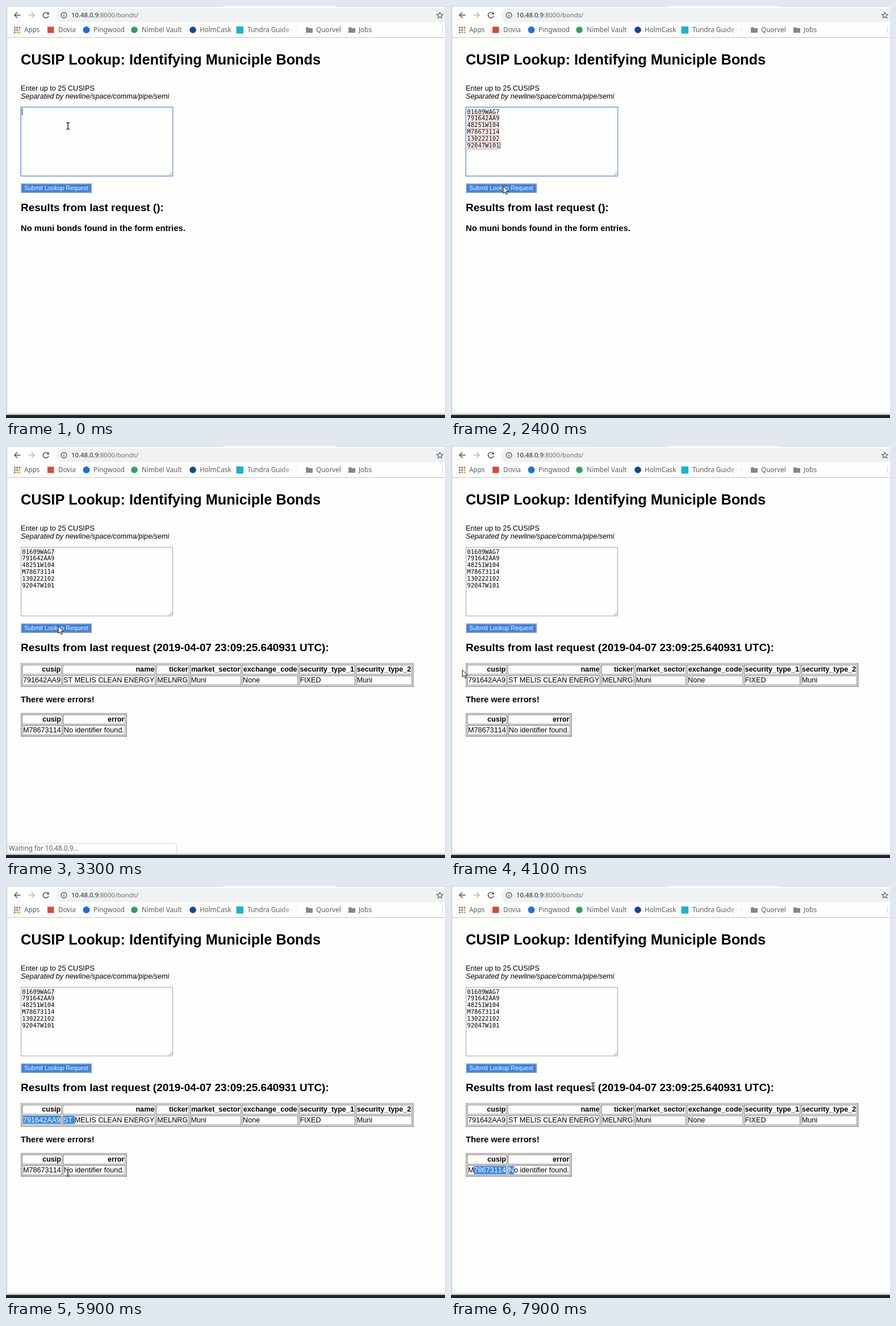
Write an HTML page that moves like this. It is 773x725 px and loops after 8 s.

```html
<!DOCTYPE html>
<html lang="en">
<head>
<meta charset="utf-8">
<title>Bond lookup</title>
<style>
html, body { margin: 0; width: 100%; height: 100%; overflow: hidden; background: #fefefd; }
#stage { position: relative; width: 773px; height: 725px; overflow: hidden; }
svg { position: absolute; left: 0; top: 0; }
svg text { font: 11.7px "Noto Sans", "Open Sans", sans-serif; fill: #5a5c60; }
#page {
  position: absolute; left: 26px; top: 0; width: 940px; height: 900px;
  transform: scale(.79); transform-origin: 0 0; font-kerning: none;
  font: 16px/18px "Liberation Sans", Arial, sans-serif; color: #000;
}
#page > * { position: absolute; left: 0; margin: 0; white-space: nowrap; font-kerning: none; }
h1 { top: 101.3px; font-size: 32px; line-height: 36px; }
h2 { top: 434.7px; font-size: 24px; line-height: 27px; }
h3 { font-size: 18.72px; line-height: 21px; }
#intro { top: 173.8px; }
#box {
  top: 225.3px; width: 339px; height: 153.5px; box-sizing: border-box; padding: 2px;
  border: 1px solid #8b8b8b; white-space: pre;
  font: 13.333px/15px "DejaVu Sans Mono", monospace;
}
#box.focus { border-color: #5288cc; box-shadow: 0 0 0 .8px #80a9de; }
#send {
  top: 395px; width: 158px; height: 20.5px; box-sizing: border-box;
  border: 2px solid; border-color: #b4bccb #8d95a6 #8d95a6 #b4bccb;
  background: #3a82e4; color: #f4f8ff; font-size: 13.333px; line-height: 17px; text-align: center;
}
#send.focus { border-color: #8fb6ee; box-shadow: 0 0 0 1px #a9bdd8; }
table { border: 1px solid; border-color: #666 #2a2a2a #2a2a2a #666; border-spacing: 2px; border-collapse: separate; }
th, td { border: 1px solid; border-color: #3a3a3a #666 #666 #3a3a3a; padding: 1px; white-space: pre; }
th { text-align: right; }
td { text-align: left; }
mark { background: #3a89e4; color: #fff; padding: .5px 0; }
</style>
</head>
<body>
<div id="stage">
  <svg id="chrome" width="773" height="725">
    <defs>
      <linearGradient id="fade" gradientUnits="userSpaceOnUse" x1="485" x2="515" y1="0" y2="0">
        <stop stop-color="#5a5c60"/><stop offset="1" stop-color="#5a5c60" stop-opacity="0"/>
      </linearGradient>
    </defs>
    <path d="M0 0H383V1.6H0ZM580 0H773V1.6H580Z" fill="#d9dce1"/>
    <rect x="88" y="4" width="720" height="24.5" rx="12.2" fill="#eff2f2"/>
    <path d="M0 55.5H773" stroke="#bfc2c5"/>
    <path d="M0 0H2.4V719H0Z" fill="#d6dade"/>
    <path d="M0 716.5H773V720H0Z" fill="#dbdfe2"/>
    <rect y="719.5" width="773" height="6" fill="#202428"/>
    <path d="M768.5 36V48" stroke="#d3d6d9"/>
    <g fill="none" stroke="#505357" stroke-width="1.5">
      <path d="M25.5 16H15M20 11L15 16L20 21"/>
      <path d="M39.5 16H50M45 11L50 16L45 21" stroke="#b9bcc0"/>
      <g id="reload"><path d="M73.8 12.7A4.9 4.9 0 1 0 75 17.2"/><path d="M75.6 10.4V15H71Z" fill="#505357" stroke="none"/></g>
      <path id="stop" d="M65.7 11.6L74.5 20.4M74.5 11.6L65.7 20.4"/>
      <circle cx="102" cy="16.2" r="4.9" stroke-width="1.2"/>
      <path d="M102 15.6V19M102 13.2V14.5" stroke-width="1.3"/>
      <path d="M764 11l1.5 3.6 3.9.3-3 2.5 1 3.8-3.4-2.1-3.4 2.1 1-3.8-3-2.5 3.9-.3Z" stroke-width="1.1"/>
    </g>
    <text x="115" y="20.2" style="font-size:11.3px"><tspan fill="#222426">10.48.0.9</tspan><tspan fill="#6b6e72">:8000/bonds/</tspan></text>
    <g id="dots"></g>
    <rect x="73" y="36.5" width="11.5" height="11" fill="#d64a3d"/>
    <circle cx="141.5" cy="42" r="6" fill="#1b72dc"/>
    <circle cx="226" cy="42" r="5.8" fill="#2ea35d"/>
    <circle cx="329" cy="42" r="5.8" fill="#0b499c"/>
    <rect x="405.5" y="36" width="12.5" height="12.5" fill="#16b3cf"/>
    <g id="marks"></g>
  </svg>

  <div id="page">
    <h1>CUSIP Lookup: Identifying Municiple Bonds</h1>
    <div id="intro">Enter up to 25 CUSIPS<br><i>Separated by newline/space/comma/pipe/semi</i></div>
    <div id="box"></div>
    <div id="send">Submit Lookup Request</div>
    <h2 id="title"></h2>
    <h3 id="none" style="top:483.5px">No muni bonds found in the form entries.</h3>
    <table id="found" style="top:483.5px"></table>
    <h3 id="oops" style="top:554.2px">There were errors!</h3>
    <table id="errors" style="top:595px"></table>
  </div>

  <svg id="over" width="773" height="725">
    <path d="M287 298L292.5 292.5M290 298L292.5 295.5" stroke="#777" stroke-width=".8"/>
    <path id="wavy" fill="none" stroke="#dc4a4a" stroke-width=".9"/>
    <path id="caret" d="M0 0V12" stroke="#111"/>
    <g id="status">
      <path d="M2.5 699.5H298Q300.5 699.5 300.5 702V717H2.5Z" fill="#fefefd" stroke="#d6d8da"/>
      <text x="5" y="712.3">Waiting for 10.48.0.9…</text>
    </g>
    <path id="arrow" d="M0 0V12.6L3 9.9L5.1 14.7L7.2 13.8L5.1 9.2H9Z" fill="#fff" stroke="#111" stroke-linejoin="round"/>
    <g id="beam" fill="none">
      <path d="M-3-5.5H3M0-5.5V5.5M-3 5.5H3" stroke="#fff" stroke-width="3.2"/>
      <path d="M-3-5.6H-1L0-5L1-5.6H3M0-5V5M-3 5.6H-1L0 5L1 5.6H3" stroke="#111" stroke-width="1.4"/>
    </g>
  </svg>
</div>
<script>
const LOOP = 8000;
const $ = id => document.getElementById(id);
const show = (id, on) => { $(id).style.display = on ? "" : "none"; };
const codes = ["01609WAG7", "791642AA9", "48251W104", "M78673114", "130222102", "92047W101"];

// Toolbar parts
const dotColors = ["#d8503f", "#d8503f", "#d8503f", "#3f9a55", "#4a80d8", "#d9a520", "#3f9a55", "#d9a520", "#d9a520"];
$("dots").innerHTML = dotColors.map((c, i) =>
  `<rect x="${14 + i % 3 * 4.2}" y="${36.7 + Math.floor(i / 3) * 4.2}" width="2.8" height="2.8" fill="${c}"/>`).join("");
const marks = [[32, "Apps"], [92, "Dovia"], [154, "Pingwood"], [239, "Nimbel Vault"], [341, "HolmCask"],
  [425, "Tundra Guide - P"], [546, "Quorvel"], [621, "Jobs"]];
$("marks").innerHTML = marks.map(([x, s]) =>
  `<text x="${x}" y="46"${x === 425 ? ' style="fill:url(#fade)"' : ""}>${s}</text>`).join("") +
  [528, 603].map(x => `<path d="M${x} 37.5h4.5l1.5 1.6h6v8h-12z" fill="#85878a"/>`).join("");

$("wavy").setAttribute("d", codes.map((_, i) =>
  `M28.4 ${191.4 + i * 11.85}` + "l1.58 1.5l1.58-1.5".repeat(18)).join(""));

// Result tables, with columns rounded up to whole pixels
const table = (id, head, row) => {
  const cells = (tag, list) => `<tr>${list.map(s => `<${tag}>${s}</${tag}>`).join("")}</tr>`;
  $(id).innerHTML = cells("th", head) + cells("td", row);
  const tds = [...$(id).querySelectorAll("td")];
  const widths = tds.map(el => Math.ceil(parseFloat(getComputedStyle(el).width) - .02));
  return tds.map((el, i) => {
    el.style.minWidth = widths[i] + "px";
    return { el, text: row[i], key: "" };
  });
};
const found = table("found",
  ["cusip", "name", "ticker", "market_sector", "exchange_code", "security_type_1", "security_type_2"],
  ["791642AA9", "ST MELIS CLEAN ENERGY", "MELNRG", "Muni", "None", "FIXED", "Muni"]);
const errors = table("errors", ["cusip", "error"], ["M78673114", "No identifier found."]);

function select(cell, from, to) {
  const key = from + "-" + to;
  if (cell.key === key) return;
  cell.key = key;
  const s = cell.text;
  cell.el.innerHTML = to > from
    ? `${s.slice(0, from)}<mark>${s.slice(from, to)}</mark>${s.slice(to)}` : s;
}

// time, x, y, pointer shape
const A = "arrow", I = "beam";
const moves = [
  [0, 109, 211, I], [1400, 107, 236, I], [1500, 101, 288, A], [1600, 97, 318, A],
  [1800, 97, 321, A], [1900, 97, 325, A], [2000, 96, 328, A], [2100, 96, 328, A],
  [2200, 95, 325, A], [2300, 93, 320, A], [2400, 92, 317, A],
  [3500, 90, 319, A], [3600, 84, 325, A], [3800, 48, 362, A], [3900, 23, 392, A],
  [4100, 20, 394, A], [4200, 30, 401, A], [4300, 42, 408, I], [4600, 42, 410, I], [4700, 39, 411, I],
  [4900, 66, 411, I], [5000, 107, 411, I], [5200, 118, 411, I], [5300, 123, 411, I], [5600, 127, 418, I],
  [5800, 131, 450, A], [5900, 109, 505, I], [6100, 108, 505, I], [6400, 109, 504, I],
  [6600, 90, 498, I], [6700, 51, 497, I], [6900, 42, 497, I], [7100, 41, 498, I],
  [7300, 47, 503, I], [7400, 108, 482, I], [7500, 184, 440, A],
  [7600, 252, 396, A], [7700, 288, 364, A], [7800, 270, 354, I], [7900, 250, 352, I]
];
// time, selected range in first cell, selected range in second cell
const picksFound = [[0, 0, 0, 0, 0], [4900, 0, 5, 0, 0], [5200, 0, 9, 0, 2], [5300, 0, 9, 0, 3], [6300, 0, 0, 0, 0]];
const picksErrors = [[0, 0, 0, 0, 0], [6600, 7, 9, 0, 1], [6700, 2, 9, 0, 1], [6900, 1, 9, 0, 1]];
const fades = [[0, 0], [3000, 1], [3500, .6], [3600, .15], [3800, 0]];
const at = (steps, t) => steps.findLast(s => s[0] <= t);

function render(t) {
  const pasted = t >= 1100, loading = t >= 2700 && t < 3300, done = t >= 3300;
  $("box").textContent = pasted ? codes.join("\n") : "";
  $("box").className = t < 2700 ? "focus" : "";
  $("send").className = loading ? "focus" : "";
  $("title").textContent = `Results from last request (${done ? "2019-04-07 23:09:25.640931 UTC" : ""}):`;
  show("none", !done);
  for (const id of ["found", "oops", "errors"]) show(id, done);
  show("wavy", pasted && !done);
  show("reload", !loading);
  show("stop", loading);

  show("caret", t < 900 || (t >= 1100 && t < 1600) || (t >= 2100 && t < 2600));
  $("caret").setAttribute("transform", pasted ? "translate(86.2 239.3)" : "translate(28.6 180)");
  $("status").style.opacity = at(fades, t)[1];

  for (const [cells, picks] of [[found, picksFound], [errors, picksErrors]]) {
    const p = at(picks, t);
    select(cells[0], p[1], p[2]);
    select(cells[1], p[3], p[4]);
  }

  const [, x, y, shape] = at(moves, t);
  show(A, shape === A);
  show(I, shape === I);
  $(shape).setAttribute("transform", `translate(${x} ${y})`);
}

const start = performance.now();
function tick() {
  render((performance.now() - start) % LOOP);
  requestAnimationFrame(tick);
}
tick();
</script>
</body>
</html>
```
